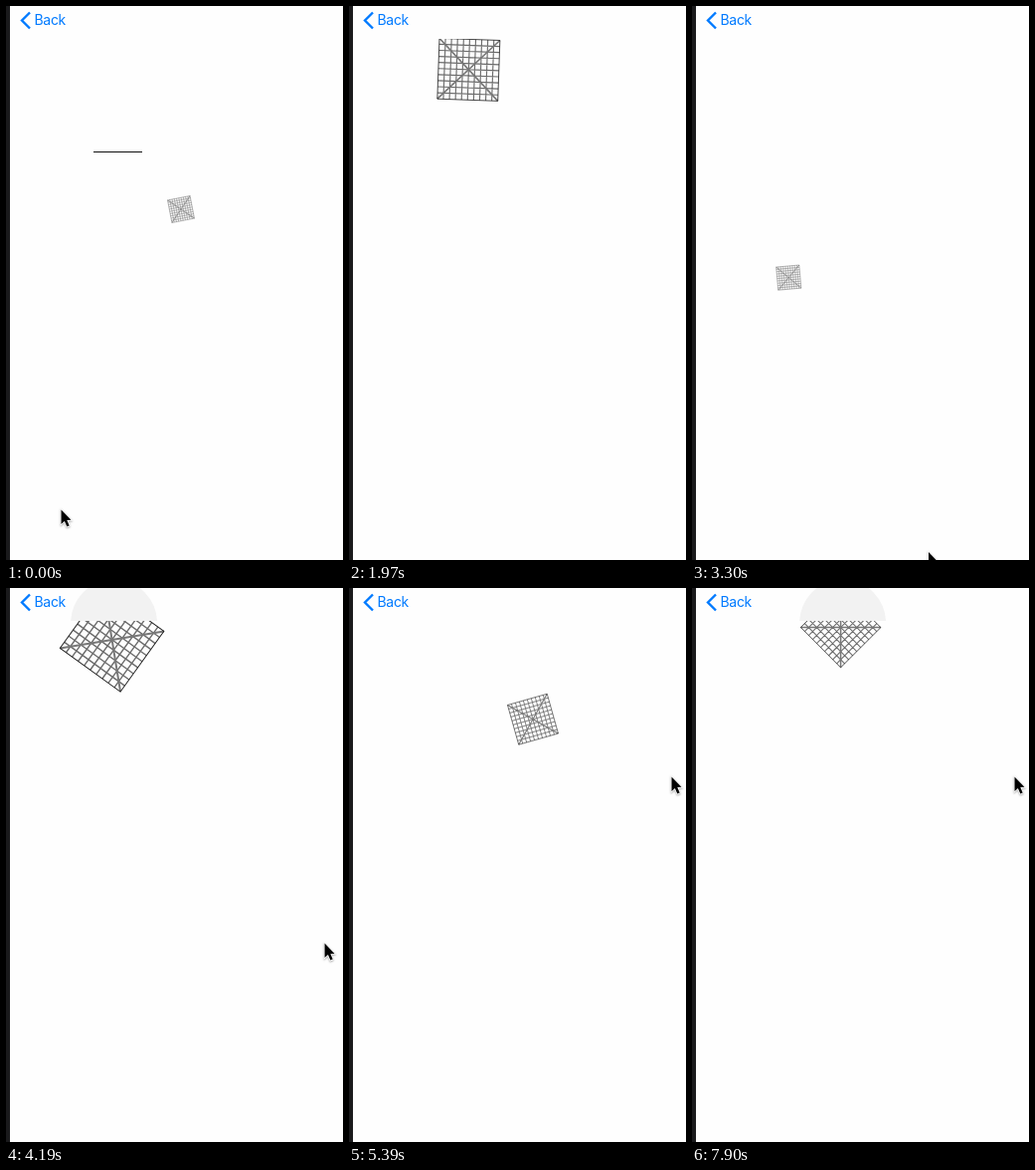
These frames come from a looping animation (339 px wide and 556 px high, 8 s). An HTML page with a canvas:

```html
<!DOCTYPE html>
<html lang="en">
<head>
<meta charset="utf-8">
<title>Falling grid</title>
<style>
  html, body { margin: 0; width: 100%; height: 100%; overflow: hidden; background: #fefefe; }
  canvas { display: block; }
</style>
</head>
<body>
<canvas id="stage" width="339" height="556"></canvas>
<script>
const ctx = document.getElementById('stage').getContext('2d');
const W = 339, H = 556, LOOP = 8000, BAR = 33;
const GRAVITY = 1.413e-4, SHRINK = 0.0282, CELLS = 10;

// The picture advances in steps: [start, number of steps up to the next start]
const HOLDS = [[0, 1], [180, 7], [1230, 8], [2410, 8], [3600, 8], [4790, 8], [5980, 8], [7160, 6], [8050, 1]];

// State of each square at time `at`; angles in degrees, speeds per ms
const SQUARES = [
  { from: 0, at: 0, x: 176, y: 204, vx: 0.017, vy: 0.21, ax: 0, size: 23, angle: -11, spin: 0.03 },
  { from: 1225, at: 1970, x: 120.3, y: 64, vx: -0.0173, vy: 0.0624, ax: 0, size: 60.8, angle: 2, spin: -0.0053 },
  { from: 4000, at: 4190, x: 106.3, y: 52, vx: 0.061, vy: -0.0177, ax: 8.1e-6, size: 75, angle: 36, spin: -0.0433 },
  { from: 7000, at: 7900, x: 149.5, y: 39.5, vx: 0.0635, vy: 0.0421, ax: 0, size: 57, angle: 45, spin: 0.033 }
];

// Pointer keys: [time, x, y]
const POINTER = [
  [0, 55.5, 505.5], [180, 55.5, 505.5], [1080, 37, 522], [1680, 76, 562], [1900, 90, 590],
  [3000, 205, 590], [3300, 237.5, 548.5], [3450, 264, 520], [3900, 324, 430],
  [4190, 320.5, 358.5], [4640, 324.5, 189.5], [8000, 324.5, 189.5]
];

// Leftover dashes: [x, y, width, colour, from, to]
const DASHES = [
  [88, 146, 49, '#111', 0, 1225],
  [261, 371, 7, '#aaa', 6560, 7000]
];

function heldTime(t) {
  let i = HOLDS.length - 2;
  while (HOLDS[i][0] > t) i--;
  const [start, count] = HOLDS[i];
  const step = (HOLDS[i + 1][0] - start) / count;
  return start + Math.floor((t - start + 6) / step) * step;
}

function pointerAt(t) {
  const i = Math.max(1, POINTER.findIndex(k => k[0] >= t));
  const [t0, x0, y0] = POINTER[i - 1], [t1, x1, y1] = POINTER[i];
  const p = (t - t0) / (t1 - t0);
  return [x0 + (x1 - x0) * p, y0 + (y1 - y0) * p];
}

function poseAt(s, t) {
  const d = t - s.at;
  return {
    x: s.x + s.vx * d + s.ax * d * d / 2,
    y: s.y + s.vy * d + GRAVITY * d * d / 2,
    size: s.size - SHRINK * d,
    angle: (s.angle + s.spin * d) * Math.PI / 180
  };
}

function strokeLines(lines, color, width) {
  ctx.beginPath();
  for (const [x0, y0, x1, y1] of lines) {
    ctx.moveTo(x0, y0);
    ctx.lineTo(x1, y1);
  }
  ctx.strokeStyle = color;
  ctx.lineWidth = width;
  ctx.stroke();
}

function drawGrid({ x, y, size, angle }) {
  const h = size / 2, unit = size / 75, inner = [];
  for (let i = 1; i < CELLS; i++) {
    const p = -h + size * i / CELLS;
    inner.push([p, -h, p, h], [-h, p, h, p]);
  }
  ctx.save();
  ctx.beginPath();
  ctx.rect(0, BAR, W, H - BAR);
  ctx.clip();
  ctx.translate(x, y);
  ctx.rotate(angle);
  strokeLines(inner, '#6c6c6c', 1.4 * unit);
  strokeLines([[-h, -h, h, h], [h, -h, -h, h]], '#777', 2 * unit);
  ctx.strokeStyle = '#222';
  ctx.lineWidth = Math.max(0.3, unit);
  ctx.strokeRect(-h, -h, size, size);
  ctx.restore();
}

// Soft shade of a square passing under the bar
function drawShade({ x, y, size, angle }) {
  const half = size / 2 * (Math.abs(Math.cos(angle)) + Math.abs(Math.sin(angle)));
  if (y - half > 25) return;
  ctx.save();
  ctx.beginPath();
  ctx.rect(4, 0, W, BAR);
  ctx.clip();
  ctx.beginPath();
  ctx.arc(x + 2, 35, 43.5, 0, Math.PI * 2);
  ctx.fillStyle = '#f2f2f2';
  ctx.fill();
  ctx.restore();
}

function drawBack() {
  ctx.beginPath();
  ctx.moveTo(24, 6.5);
  ctx.lineTo(16, 14.5);
  ctx.lineTo(24, 22.5);
  ctx.strokeStyle = ctx.fillStyle = '#007aff';
  ctx.lineWidth = 2.4;
  ctx.stroke();
  ctx.font = '14px Inter, sans-serif';
  ctx.letterSpacing = '-0.3px';
  ctx.fillText('Back', 28.5, 19.3);
}

function drawPointer([x, y]) {
  ctx.save();
  ctx.translate(x, y);
  ctx.beginPath();
  ctx.moveTo(0, 0);
  for (const [px, py] of [[0, 14.5], [3.4, 11.4], [5.8, 17], [8.2, 16], [5.8, 10.6], [10, 10.3]]) ctx.lineTo(px, py);
  ctx.closePath();
  ctx.shadowColor = 'rgba(0,0,0,0.35)';
  ctx.shadowBlur = 2;
  ctx.shadowOffsetY = 1;
  ctx.strokeStyle = '#fff';
  ctx.lineWidth = 1.6;
  ctx.stroke();
  ctx.shadowColor = 'transparent';
  ctx.fillStyle = '#000';
  ctx.fill();
  ctx.restore();
}

function draw(t) {
  ctx.fillStyle = '#fefefe';
  ctx.fillRect(0, 0, W, H);
  for (const [x, y, w, color, from, to] of DASHES) {
    if (t < from || t >= to) continue;
    ctx.fillStyle = color;
    ctx.fillRect(x, y, w, 1);
  }
  for (const s of SQUARES) {
    const pose = poseAt(s, t);
    if (t < s.from || pose.size < 1.5) continue;
    drawShade(pose);
    drawGrid(pose);
  }
  ctx.fillStyle = '#1a1a1c';
  ctx.fillRect(0, 0, 4, H);
  drawBack();
  drawPointer(pointerAt(t));
}

function tick() {
  draw(heldTime(performance.now() % LOOP));
  requestAnimationFrame(tick);
}
tick();
</script>
</body>
</html>
```
